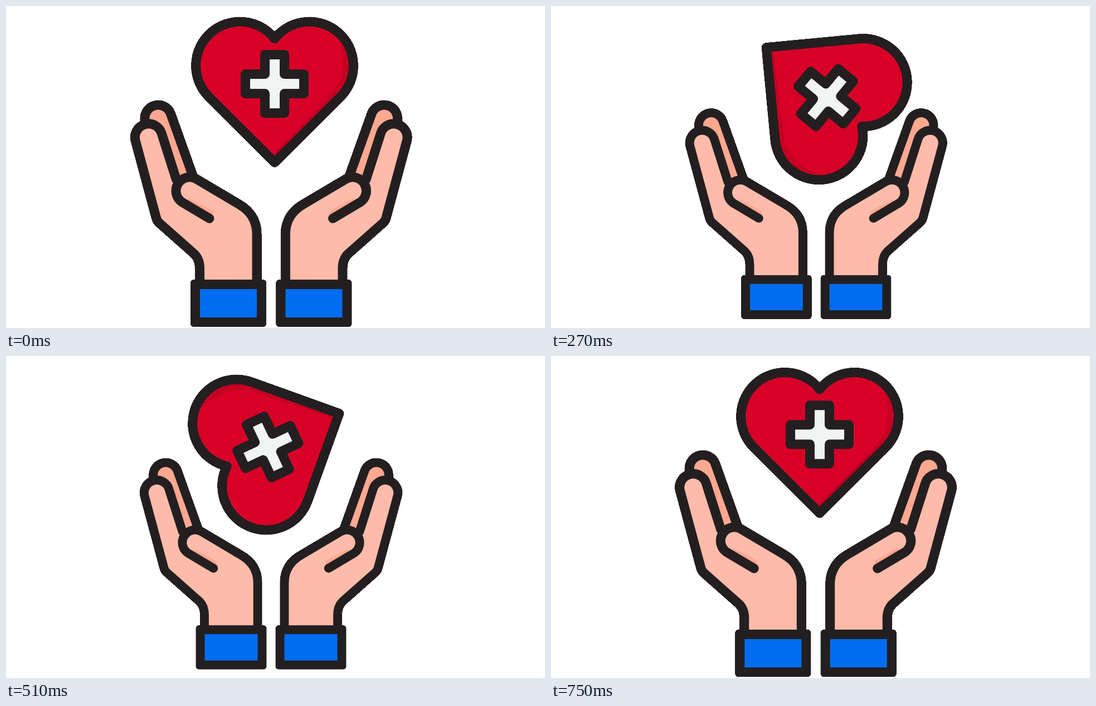
These frames come from a looping animation (967 by 579 pixels, 0.78 s). An HTML page:

```html
<!DOCTYPE html>
<html lang="en">
<head>
<meta charset="utf-8">
<title>Caring hands</title>
<style>
  html, body { margin: 0; width: 100%; height: 100%; overflow: hidden; background: #fff; }
  svg { display: block; width: 100vw; height: 100vh; }
  .line { fill: none; stroke: #231f20; stroke-width: 17; stroke-linecap: round; stroke-linejoin: round; }
  .skin { fill: #ffbbaa; }
  .shade { fill: #ffa890; }
  .crisp { shape-rendering: crispEdges; }

  #hands {
    transform-origin: 475.9px 373.5px;
    animation: squeeze 780ms -1ms infinite;
  }
  #heart {
    transform-origin: 483px 155px;
    animation: spin 780ms steps(26) -1ms infinite, sink 780ms -1ms infinite;
  }
  @keyframes squeeze {
    0% { scale: 1; translate: 0 0; animation-timing-function: steps(13); }
    50% { scale: .898; translate: 0 .4px; animation-timing-function: steps(12); }
    96.1538%, 100% { scale: 1; translate: -.7px 0; }
  }
  @keyframes spin {
    from { rotate: 0deg; }
    to { rotate: 374.4deg; }
  }
  @keyframes sink {
    0% { translate: 0 0; animation-timing-function: steps(13); }
    50%, 100% { translate: 0 1.3px; }
  }
</style>
</head>
<body>
<svg viewBox="0 0 967 579">
  <defs>
    <path id="back" class="line" d="M249 212V202A24 24 0 0 1 295.5 193.7L335.5 306"/>
    <path id="front" class="line" d="M347.5 500V472C347.5 460 344 452 338 446L276 391Q271 387 269.5 381L232.4 243A24.4 24.4 0 0 1 279.3 229.5L305.5 312"/>
    <path id="thumb" class="line" d="M365 382L315.5 352.5A24.5 24.5 0 0 1 340.5 310.5L418 356.5C438 368 450 386 450 410V500"/>
    <rect id="cuff" x="331" y="492" width="136" height="85" rx="6" fill="#231f20"/>
    <path id="contour" d="M482 58.7A79 79 0 1 0 363.6 162.9L482 281.3L600.4 162.9A79 79 0 1 0 482 58.7Z"/>

    <g id="hand">
      <!-- hard outer edge below the smooth drawing -->
      <g class="crisp">
        <use href="#back"/><use href="#front"/><use href="#thumb"/><use href="#cuff"/>
      </g>
      <path class="shade" d="M249 212V202A24 24 0 0 1 295.5 193.7L336 306L305 315Z"/>
      <use href="#back"/>
      <path class="skin" d="M347.5 500V472C347.5 460 344 452 338 446L276 391Q271 387 269.5 381L232.4 243A24.4 24.4 0 0 1 279.3 229.5L305 312L328 307L340.5 310.5L418 356.5C438 368 450 386 450 410V500Z"/>
      <path class="shade" d="M328 345L367 366Q374 371 371 382L324 356Z"/>
      <use href="#front"/>
      <use href="#thumb"/>
      <use href="#cuff"/>
      <rect x="348" y="509" width="102" height="51" fill="#006df0"/>
    </g>
  </defs>

  <g id="hands">
    <use href="#hand"/>
    <use href="#hand" transform="matrix(-1 0 0 1 951.4 0)"/>
  </g>

  <g id="heart">
    <use href="#contour" class="line crisp"/>
    <use href="#contour" fill="#d80027"/>
    <path fill="#c50023" d="M577 36C596 52 604 76 604 102C604 124 599 141 586 155L482 264V281L600.4 162.9A79 79 0 0 0 577 36Z"/>
    <use href="#contour" class="line"/>
    <path class="line" style="fill:#f1f4f3" d="M464.5 87.5h35v35h35v35h-35v35h-35v-35h-35v-35h35Z"/>
  </g>
</svg>
</body>
</html>
```
